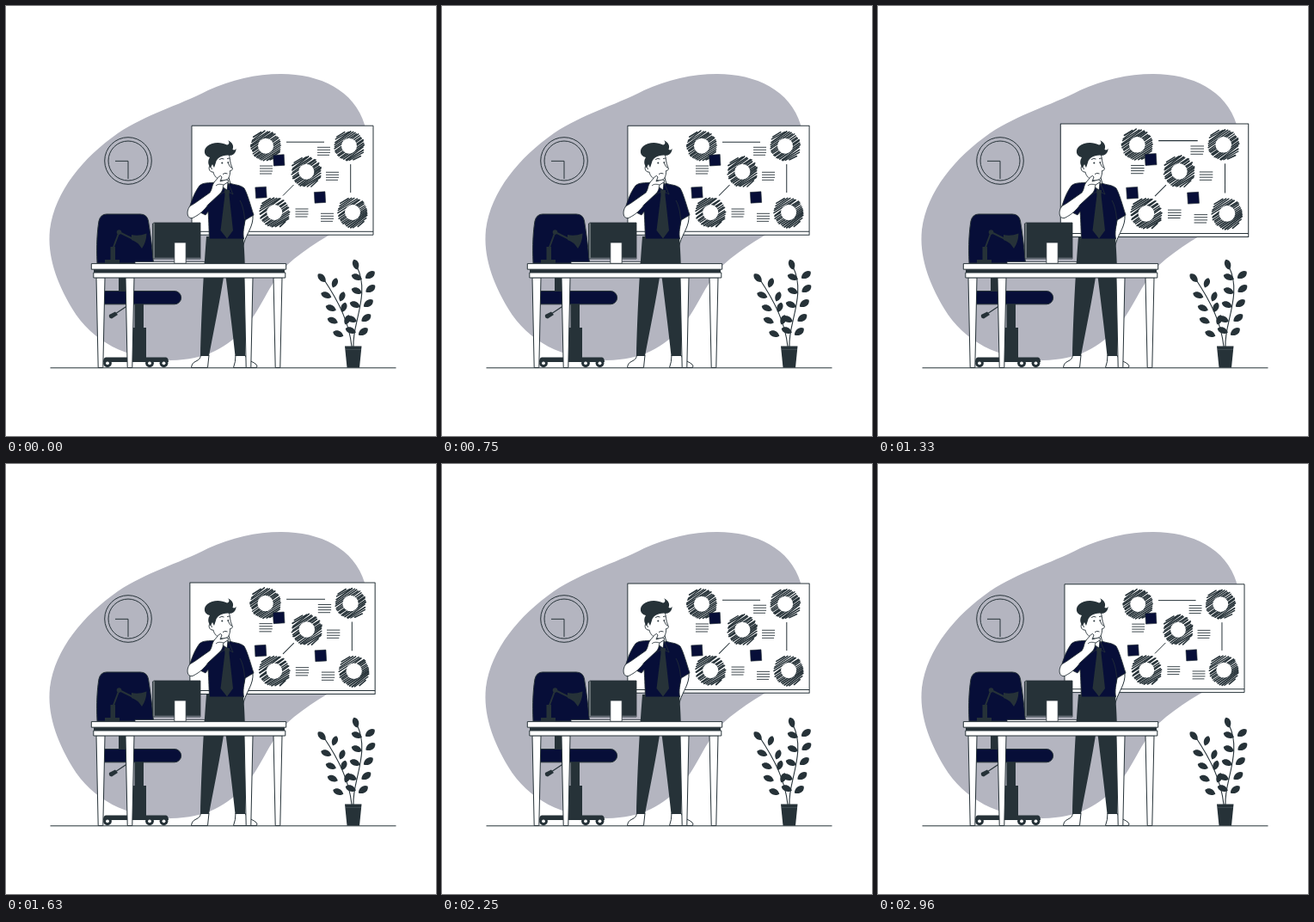
These frames come from a looping animation (500x500 px, 3 s). An HTML page with a canvas:

```html
<!DOCTYPE html>
<html lang="en">
<head>
<meta charset="utf-8">
<title>Planning board</title>
<style>
html, body { margin: 0; width: 100%; height: 100%; overflow: hidden; background: #fff; }
canvas { display: block; width: 500px; height: 500px; }
</style>
</head>
<body>
<canvas id="stage"></canvas>
<script>
const canvas = document.getElementById('stage');
const ctx = canvas.getContext('2d');
const dpr = window.devicePixelRatio || 1;
canvas.width = canvas.height = 500 * dpr;

const INK = '#263238', NAVY = '#070e38', GREY = '#b4b5c0', WHITE = '#fff';
const LOOP = 3000;
const CENTER = [321.5, 202.6];
const BASE = 211;
// Board width at each turning point; linear in between
const PULSE = [[-40, 209], [350, 228], [790, 209.5], [1180, 226],
  [1520, 209], [1855, 228], [2205, 209], [2585, 228], [2960, 209], [3350, 228]];

function boardScale(t) {
  const i = PULSE.findIndex(p => p[0] > t);
  const [t0, a] = PULSE[i - 1], [t1, b] = PULSE[i];
  return (a + (b - a) * (t - t0) / (t1 - t0)) / BASE;
}

function shape(d, fill, stroke, width = 1) {
  const p = new Path2D(d);
  if (fill) { ctx.fillStyle = fill; ctx.fill(p); }
  if (stroke) { ctx.strokeStyle = stroke; ctx.lineWidth = width; ctx.stroke(p); }
}

function box(x, y, w, h, fill, stroke, width) {
  shape(`M${x} ${y}h${w}v${h}h${-w}Z`, fill, stroke, width);
}

function disc(x, y, r, fill, stroke, width) {
  shape(`M${x - r} ${y}a${r} ${r} 0 1 0 ${2 * r} 0a${r} ${r} 0 1 0 ${-2 * r} 0Z`, fill, stroke, width);
}

function seeded(n) {
  return () => (n = (n * 16807) % 2147483647) / 2147483647;
}

function backdrop() {
  shape('M320 79C365 79 405 98 417 138C430 182 424 232 401 252C376 266 350 280 326 302' +
    'C304 326 298 350 280 371C258 398 232 411 192 412C140 411 100 390 77 352' +
    'C58 320 48 290 51 260C57 215 90 176 130 148C165 125 198 117 235 98C262 86 290 79 320 79Z', GREY);
  shape('M51.5 420.8H453.5', null, INK);
  disc(142, 180, 27.3, null, INK);
  disc(142, 180, 23, null, INK);
  shape('M127 180.3H142V201', null, INK);
}

function badge(x, y, seed) {
  const rnd = seeded(seed), r = 17.5;
  ctx.save();
  ctx.translate(x, y);
  ctx.rotate(-0.6);
  ctx.lineCap = 'round';
  for (let v = -r + 1; v < r; v += 1.95) {
    const half = Math.sqrt(r * r - v * v);
    const a = -half + rnd() * 1.5, b = half - rnd() * 1.5;
    const tilt = (rnd() - 0.5) * 1.6;
    shape(`M${a} ${v + tilt}L${b} ${v - tilt}`, null, INK, 1.35 + rnd() * 0.5);
  }
  ctx.restore();
  disc(x, y, 9, WHITE);
}

function note(x, y) {
  ctx.save();
  ctx.translate(x, y);
  ctx.rotate(-0.06);
  box(-6.3, -6.3, 12.6, 12.6, NAVY, INK, 0.6);
  ctx.restore();
}

function textLines(x, y) {
  for (let i = 0; i < 4; i++)
    shape(`M${x} ${y + i * 3}h${i === 3 ? 14 : 15}`, null, INK, 0.9);
}

function board(s) {
  ctx.save();
  ctx.translate(...CENTER);
  ctx.scale(s, s);
  ctx.translate(-CENTER[0], -CENTER[1]);
  box(216, 139.2, 211, 127, WHITE, INK);
  shape('M216 262.3H427', null, INK);
  shape('M326 158.2H370M400.7 184V217M322 220.5L334.5 208', null, INK);
  [[362, 164.3], [295, 186], [372, 193.3], [336.5, 236], [366, 241.3]].forEach(p => textLines(...p));
  [[302, 162.7], [399, 162.7], [349.3, 192.7], [312.2, 240], [403, 240]]
    .forEach(([x, y], i) => badge(x, y, 911 + i * 577));
  [[317.3, 179.3], [296.5, 216.8], [365, 222.5]].forEach(p => note(...p));
  ctx.restore();
}

function chair() {
  shape('M131 298H139V332H131Z', INK);
  shape('M106 299C105 278 106 262 108 250Q110 242 117 242H156Q164 242 165.5 250C168 265 170 282 171.5 299Z', NAVY, INK);
  box(149.5, 346, 10.5, 30, INK);
  box(147, 374, 16, 35, INK);
  shape('M142 348L127 358', null, INK, 1.2);
  shape('M120 359L127 355.5L130 359L123 363.5Q119 363 120 359Z', INK);
  shape('M114 331.5H196A7.5 7.5 0 0 1 196 346.8H114Z', NAVY, INK);
  shape('M116 408.5H186Q189 409 189 414H113Q113 409 116 408.5Z', INK);
  [118, 167, 183.5].forEach(x => {
    disc(x, 415.3, 4.9, INK);
    disc(x, 415.3, 1.9, WHITE);
  });
}

function lamp() {
  box(121.5, 280, 5.5, 19, INK);
  shape('M115 299V295H132V299Z', INK);
  shape('M124 283L131.5 263L152 273', null, INK, 2);
  disc(131.5, 263, 2.8, INK);
  shape('M146 266Q154 268 163.5 264.5Q163 275 158 282Q153 274 146 272Z', INK);
}

function person() {
  // Neck, back arm and shoes
  shape('M246 194L247 211L258 216L261 207L258 196Z', WHITE, INK);
  shape('M287 243C288 256 280 264 276.5 276L275 281L272 270C276 260 278 252 278 245Z', WHITE, INK);
  shape('M226.5 406H236L234.5 420.5H215.5Q216 415 221 413Q226 411 226.5 406Z', WHITE, INK);
  shape('M267 406H278C280 412 286 413 290 416Q293 418 291.5 420.5H264.5Q267 414 267 406Z', WHITE, INK);
  shape('M233 268H276C279 305 279 360 278 407H266.5C263 373 258 335 254.5 306C249 342 241 380 236 407H226' +
    'C227 360 230 305 233 268Z', INK);

  // Shirt and tie
  shape('M244 205C236 206 229 205 225 209C219 217 216 226 213.5 234L232 243L235 239' +
    'C236 252 236 262 236.5 271H276.5C275 263 277 256 278 249L288 243C284 231 281 219 277 212' +
    'C273 208 265 208 260 206L257 214Z', NAVY, INK, 0.9);
  shape('M277.5 248C277 240 275 231 272 226', null, INK, 0.8);
  shape('M246 206L256.5 215L247 220ZM258 205L257 215L264 219Z', NAVY, INK, 0.8);
  shape('M254 214H260L259.5 220L264 261L257 270.5L249.5 261L254.5 220Z', INK);

  // Head
  shape('M239 183C240 175 250 171 259 171C261 178 260 182 263 188Q264.5 191 260.5 191.5' +
    'C261 198 258 204 252 203C246 202 242 198 241 193C236 194 234 186 239 184Z', WHITE, INK, 0.9);
  shape('M238 188C234 184 235 179 237 176C230 175 229 167 234 163C240 158 250 158 257 161.5' +
    'C260 161 260 158 258 156C264 159 265 163 263.5 167C266 168 267 167 267.5 165.5' +
    'C268 171 263 175 258 173.5C250 174 245 177 244 182L242 188L240 184Z', INK);
  shape('M248 178.5Q251 176.5 253.5 178M257 177.5L260 177M258 182Q260 187 262.5 188.5M252 195.5Q255 193.5 257.5 195M237 187Q239 187 239.5 190', null, INK, 0.9);
  disc(251.3, 182.5, 1, INK);
  disc(258.3, 181.8, 0.9, INK);

  // Raised arm
  shape('M213.5 233C209 240 211 248 217 246.5C226 242 231 237 235 231L249 218C253 214 252 210 253 208' +
    'L258.5 204.5Q259 201.5 256 202L249 204L251 199Q250 196 247.5 198.5L242 205C239 209 240 213 237 217' +
    'L220 229Z', WHITE, INK, 0.9);
  shape('M244 209Q247 206 253 208', null, INK, 0.8);
}

function leg(x) {
  shape(`M${x} 315.8H${x + 10}L${x + 7.8} 420.5H${x + 2.2}Z`, WHITE, INK);
}

function desk() {
  [105, 139, 277, 311].forEach(leg);
  box(102, 306, 222, 4.5, INK);
  box(101.8, 310, 223, 6, WHITE, INK);
  box(99.3, 299.6, 226.4, 6.6, WHITE, INK);
  box(150, 297.4, 81, 2.2, WHITE, INK, 0.8);
  shape('M172 252H226V294H172L170.5 292V253Z', INK, INK, 0.8);
  shape('M172 252.5V293.5', null, WHITE, 0.6);
  shape('M172.5 293.2H226', null, GREY, 0.6);
  box(195.8, 275, 13.4, 24.3, WHITE, INK, 0.8);
}

function leaf(x, y, deg, size = 1) {
  ctx.save();
  ctx.translate(x, y);
  ctx.rotate(deg * Math.PI / 180);
  ctx.scale(size, size);
  shape('M-7 0C-4 -5 4 -6 7 -1C5 5 -3 5 -7 0Z', INK);
  ctx.restore();
}

function plant() {
  shape('M402 396C399 368 387 344 369 317M404 396C402 370 424 335 408 303', null, INK, 1.1);
  leaf(367.5, 316, -130, 0.9);
  leaf(407, 300.5, -105, 0.9);
  [[372.5, 336], [378, 351], [380, 365.5], [386.5, 381], [408, 315], [408, 331], [406, 347], [402, 364], [401, 377]]
    .forEach(([x, y]) => leaf(x, y, -155, 0.92));
  [[382.5, 322], [391, 338], [393, 350.5], [397, 365]].forEach(([x, y]) => leaf(x, y, -65, 0.85));
  [[423.5, 313], [424, 329], [421.5, 346], [419, 363], [415.5, 379]].forEach(([x, y]) => leaf(x, y, -32, 0.95));
  shape('M394 395.5H413.5L411 420.5H396.5Z', INK);
  shape('M395 399.5H413', null, '#59636a', 0.5);
}

function draw(now) {
  const t = now % LOOP;
  ctx.setTransform(dpr, 0, 0, dpr, 0, 0);
  ctx.lineJoin = 'round';
  ctx.fillStyle = WHITE;
  ctx.fillRect(0, 0, 500, 500);
  backdrop();
  board(boardScale(t));
  chair();
  lamp();
  person();
  desk();
  plant();
}

const start = performance.now();
function tick() {
  draw(performance.now() - start);
  requestAnimationFrame(tick);
}
tick();
</script>
</body>
</html>
```
